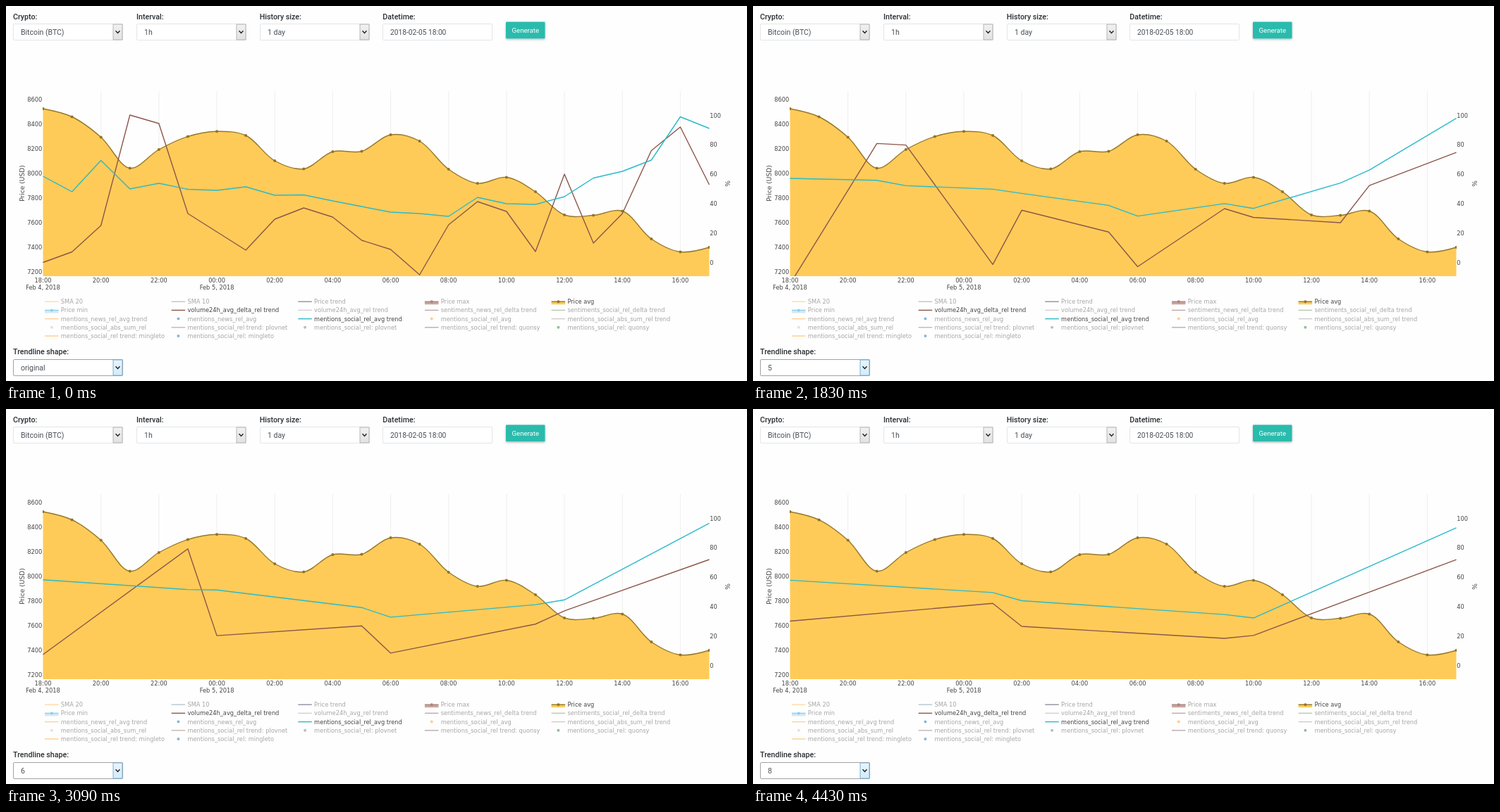
Write an HTML page that moves like this. It is 1051 by 533 pixels and loops after 5020 ms.

```html
<!DOCTYPE html>
<html lang="en">
<head>
<meta charset="utf-8">
<title>Price and trendlines</title>
<style>
  html, body { margin: 0; width: 100%; height: 100%; overflow: hidden; background: #fefefe; }
  svg { display: block; width: 1051px; height: 533px; }
  text { font: 8.25px "DejaVu Sans", Verdana, sans-serif; fill: #444; }
  .label { font: 500 10.7px Roboto, sans-serif; fill: #2b2f33; }
  .value { font: 10.5px Roboto, sans-serif; fill: #495057; }
  .button { font: 9.6px Roboto, sans-serif; fill: #fff; }
  .title { font-size: 9.1px; }
  .off { fill: #a6a6a6; }
  .mid { text-anchor: middle; }
  .end { text-anchor: end; }
  .line { fill: none; stroke-width: 1.4; stroke-linejoin: round; }
</style>
</head>
<body>
<svg id="stage" viewBox="0 0 1051 533">
  <defs>
    <clipPath id="plot"><rect x="52" y="121" width="946" height="263"/></clipPath>
    <linearGradient id="grey" x2="0" y2="1">
      <stop stop-color="#f1f1f1"/><stop offset="1" stop-color="#e2e2e2"/>
    </linearGradient>
    <linearGradient id="blue" x2="0" y2="1">
      <stop stop-color="#e8f5fd"/><stop offset="1" stop-color="#d3ecfb"/>
    </linearGradient>
    <filter id="shadow" x="-20%" y="-30%" width="140%" height="180%">
      <feDropShadow dx="0" dy="1.3" stdDeviation="1.5" flood-opacity=".3"/>
    </filter>
  </defs>
</svg>
<script>
const LOOP = 5020, LEFT = 52.5, STEP = 945 / 23, BOTTOM = 384;
const stage = document.getElementById('stage');

// Screen heights of the hourly values
const price = [146, 157.5, 186.5, 230.5, 204, 185.5, 178.3, 184, 220, 231.5, 207, 206.5,
  183, 192, 232, 252, 243.5, 264, 297, 297.5, 291.5, 331, 349.5, 343];
const volume = [364.5, 349.5, 312, 155, 167, 295, 321, 347, 303, 287, 300, 333,
  346, 382, 311, 278, 292, 349, 239, 337, 295, 205.5, 172, 254];
const mentions = [242, 264, 219.5, 260, 252, 260.5, 262, 257, 269, 268.5, 277, 285,
  293, 295, 299, 272, 281, 282, 271, 244.5, 235, 219, 157.5, 174];

// Segment length, then times: label change, first moving step, rest
const changes = [
  [3, 720, 720, 870], [4, 1230, 1320, 1470], [5, 1830, 1920, 2120],
  [6, 2800, 2940, 3090], [7, 3680, 3680, 3780], [8, 4190, 4240, 4430]
];

function add(tag, attrs, parent = stage, content) {
  const el = document.createElementNS('http://www.w3.org/2000/svg', tag);
  for (const key in attrs) el.setAttribute(key, attrs[key]);
  if (content !== undefined) el.textContent = content;
  return parent.appendChild(el);
}
const text = (x, y, content, cls = '', more = {}) =>
  add('text', { x, y, class: cls, ...more }, stage, content);
const rect = (x, y, width, height, fill, more = {}) =>
  add('rect', { x, y, width, height, fill, ...more });
const xAt = i => LEFT + i * STEP;
const toPath = pts => 'M' + pts.map(p => p.map(v => v.toFixed(2)).join()).join('L');

function select(x, y, value, focus) {
  rect(x + .5, y + .5, 155, 23, '#fff', { rx: 1.5, stroke: focus ? '#a2a2a2' : '#e3e5e7' });
  rect(x + 142, y + 1, 13, 22, focus ? 'url(#blue)' : 'url(#grey)',
    { stroke: focus ? '#6fa9cc' : '#b0b0b0', 'stroke-width': .9 });
  add('path', { d: `M${x + 145.5} ${y + 10.3}l3 3.2 3-3.2`, fill: 'none', stroke: '#222', 'stroke-width': 1.4 });
  return text(x + 11, y + 16, value, 'value');
}

function form() {
  text(10, 18.5, 'Crypto:', 'label');
  text(185, 18.5, 'Interval:', 'label');
  text(359.7, 18.5, 'History size:', 'label');
  text(534.3, 18.5, 'Datetime:', 'label');
  select(10, 25, 'Bitcoin (BTC)');
  select(185, 25, '1h');
  select(360, 25, '1 day');
  rect(534.5, 25.5, 155, 23, '#fff', { rx: 1.5, stroke: '#e3e5e7' });
  text(545, 41, '2018-02-05 18:00', 'value', { style: 'font-size:10.2px' });
  rect(709, 22.5, 55.5, 23.8, '#2bbbad', { rx: 1.3, filter: 'url(#shadow)' });
  text(736.8, 38, 'Generate', 'button mid');
  text(10, 495, 'Trendline shape:', 'label');
}

function axes() {
  for (let i = 0; i < 24; i += 2) {
    const x = xAt(i);
    if (i) rect(x - .5, 121, 1, 263, '#eee');
    text(x, 393, String((18 + i) % 24).padStart(2, '0') + ':00', 'mid');
  }
  text(LEFT, 402.5, 'Feb 4, 2018', 'mid');
  text(xAt(6), 402.5, 'Feb 5, 2018', 'mid');
  for (let i = 0; i < 8; i++) text(51.3, 136 + i * 35.04, 8600 - i * 200, 'end');
  for (let i = 0; i < 6; i++) text(998.3, 158.6 + i * 41.85, 100 - i * 20);
  text(0, 0, 'Price (USD)', 'title mid', { transform: 'translate(26 252)rotate(-90)' });
  text(0, 0, '%', 'title mid', { transform: 'translate(1026.5 252.5)rotate(-90)' });
}

// Centripetal Catmull-Rom control points on both sides of b
function tangents(a, b, c) {
  const u = [a[0] - b[0], a[1] - b[1]], v = [c[0] - b[0], c[1] - b[1]];
  const p = Math.hypot(...u) ** .5, q = Math.hypot(...v) ** .5;
  const num = u.map((d, k) => (q * q * d - p * p * v[k]) / (3 * (p + q)));
  return [b.map((d, k) => d + num[k] / q), b.map((d, k) => d - num[k] / p)];
}

function spline(pts) {
  const n = pts.length;
  const t = pts.slice(1, -1).map((p, i) => tangents(pts[i], p, pts[i + 2]));
  let d = `M${pts[0]}Q${t[0][0]} ${pts[1]}`;
  for (let i = 1; i < n - 2; i++) d += `C${t[i - 1][1]} ${t[i][0]} ${pts[i + 1]}`;
  return d + `Q${t[n - 3][1]} ${pts[n - 1]}`;
}

function area(parent) {
  const pts = price.map((y, i) => [xAt(i), y]);
  const d = spline(pts);
  add('path', { d: `${d}V${BOTTOM}H${LEFT}Z`, fill: '#ffcb58' }, parent);
  add('path', { d, class: 'line', stroke: '#96782a' }, parent);
  for (const [cx, cy] of pts) add('circle', { cx, cy, r: 2.05, fill: '#947422' }, parent);
}

function legend() {
  const social = 'mentions_social_rel';
  // Name, colour, kind: line, dot or band; * marks a visible trace
  const rows = [
    [['SMA 20', '#ffdba6'], ['SMA 10', '#b9c8d0'], ['Price trend', '#918fa2'],
      ['Price max', '#a9847e', 'band', '#c9a49c'], ['Price avg*', '#947422', 'band', '#ffcb58']],
    [['Price min', '#8fd0e8', 'band', '#d3e9f2'], ['volume24h_avg_delta_rel trend*', '#8c564b'],
      ['volume24h_avg_rel trend', '#d3cfd1'], ['sentiments_news_rel_delta trend', '#c2a6a4'],
      ['sentiments_social_rel_delta trend', '#b9c8ac']],
    [['mentions_news_rel_avg trend', '#ffd094'], ['mentions_news_rel_avg', '#8bb6d6', 'dot'],
      [social + '_avg trend*', '#2ab9ca'], [social + '_avg', '#ffcc94', 'dot'],
      ['mentions_social_abs_sum_rel trend', '#cfcacd']],
    [['mentions_social_abs_sum_rel', '#e3e1e3', 'dot'], [social + ' trend: plovnet', '#c6b6b3'],
      [social + ': plovnet', '#bcbcc2', 'dot'], [social + ' trend: quonsy', '#b9acab'],
      [social + ': quonsy', '#95bd97', 'dot']],
    [[social + ' trend: mingleto', '#ffcd8c'], [social + ': mingleto', '#8bb6d6', 'dot']]
  ];
  rows.forEach((row, r) => row.forEach(([name, color, kind = 'line', fill], c) => {
    const x = 55 + c * 179.65, y = 420.2 + r * 12.2;
    if (kind === 'band') rect(x, y, 19.5, 4, fill);
    if (kind !== 'dot') rect(x, y - .7, 19.5, 1.4, color);
    if (kind !== 'line') add('circle', { cx: x + 9.8, cy: y, r: 2, fill: color });
    text(x + 22.8, y + 3, name.replace('*', ''), name.endsWith('*') ? '' : 'off');
  }));
}

// Ends of the least-squares line through ys[a..b]
function fit(ys, a, b) {
  const mid = (a + b) / 2;
  let sum = 0, cov = 0, dev = 0;
  for (let i = a; i <= b; i++) {
    sum += ys[i];
    cov += (i - mid) * ys[i];
    dev += (i - mid) ** 2;
  }
  const mean = sum / (b - a + 1), slope = cov / dev;
  return [a, b].map(i => [xAt(i), mean + slope * (i - mid)]);
}

// Segments of n values, counted from the right; the first may be shorter
function trend(ys, n) {
  if (n === 1) return ys.map((y, i) => [xAt(i), y]);
  const pts = [];
  for (let b = 23; b >= 0; b -= n) pts.unshift(...fit(ys, Math.max(0, b - n + 1), b));
  return pts;
}

const ease = t => t < .5 ? 4 * t ** 3 : 1 - 4 * (1 - t) ** 3;

form();
axes();
const plot = add('g', { 'clip-path': 'url(#plot)' });
area(plot);
const traces = [[volume, '#8c564b'], [mentions, '#2ab9ca']].map(([ys, stroke]) => ({
  shapes: [1, ...changes.map(c => c[0])].map(n => trend(ys, n)),
  path: add('path', { class: 'line', stroke }, plot)
}));
legend();
const choice = select(10, 502, 'original', true);

function progress(time, move, end) {
  if (time < move) return 0;
  if (time >= end) return 1;
  const tick = move + Math.floor((time - move) / 50) * 50;
  return ease(Math.max(0, Math.min(1, (tick - end + 210) / 200)));
}

function draw() {
  const time = performance.now() % LOOP;
  const k = changes.filter(c => time >= c[1]).length;
  const [n, , move, end] = k ? changes[k - 1] : ['original', 0, 0, 0];
  const e = k ? progress(time, move, end) : 0;
  choice.textContent = n;
  for (const { shapes, path } of traces) {
    const from = shapes[Math.max(0, k - 1)], to = shapes[k];
    // Vertices pair up by index, so the line also stretches sideways
    const pts = e === 0 ? from : to.map((p, i) => p.map((v, j) => from[i][j] + (v - from[i][j]) * e));
    path.setAttribute('d', toPath(pts));
  }
  requestAnimationFrame(draw);
}
draw();
</script>
</body>
</html>
```
